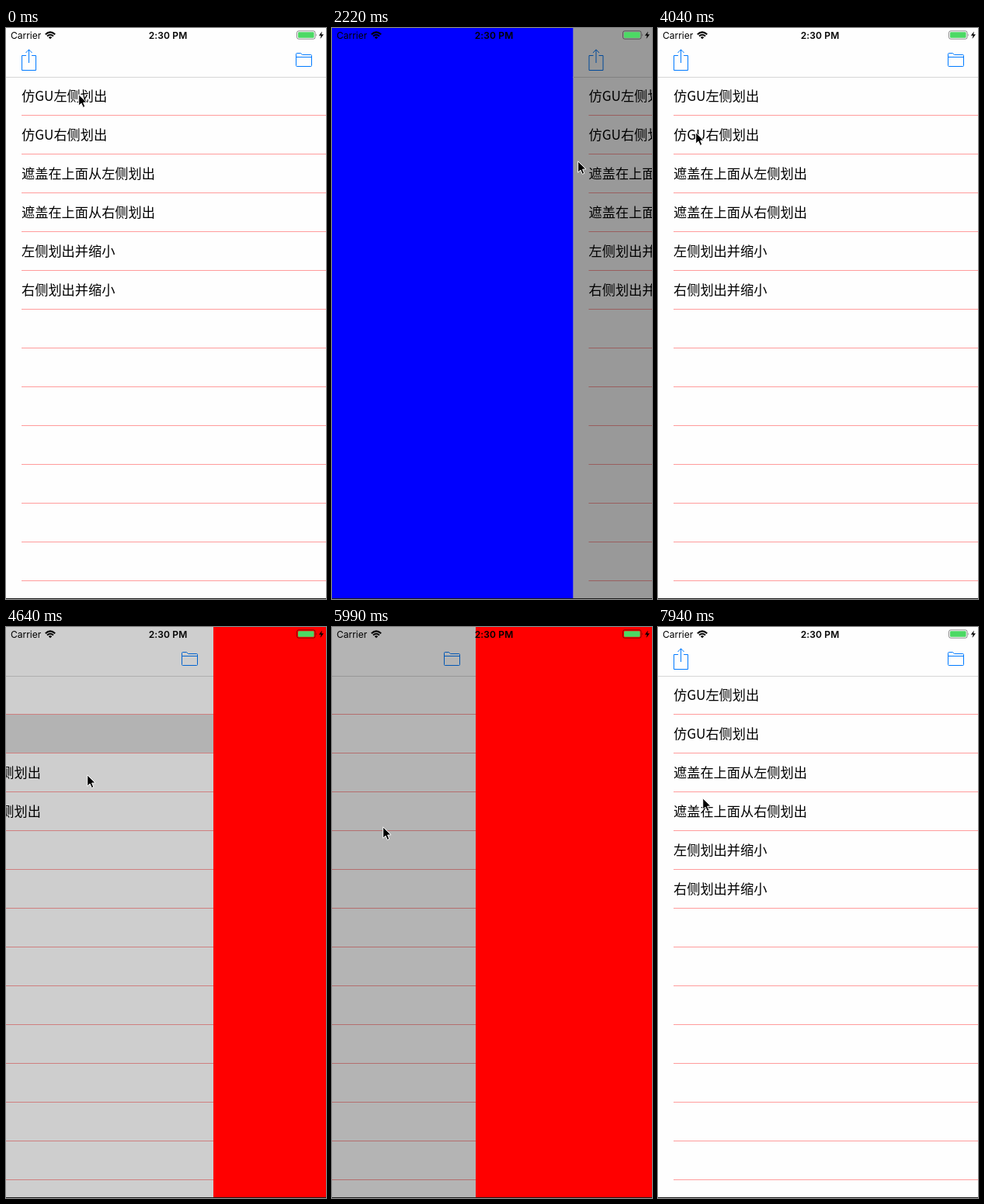
Write an HTML page that moves like this. It is 412x736 px and loops after 8 s.

```html
<!DOCTYPE html>
<html lang="zh-CN">
<head>
<meta charset="utf-8">
<title>Side drawers</title>
<style>
  html, body { margin: 0; width: 100%; height: 100%; overflow: hidden; }
  svg { display: block; width: 412px; height: 736px; }
  .row { font: 17.2px "Noto Sans CJK SC", "Noto Sans CJK", "Noto Sans SC", sans-serif; }
  .bar { font: 12px Inter, Roboto, sans-serif; }
  .clock { font-weight: 600; letter-spacing: .15px; text-anchor: middle; }
  .icon { fill: none; stroke: #007aff; stroke-width: 1; }
</style>
</head>
<body>
<svg viewBox="0 0 412 736" xmlns="http://www.w3.org/2000/svg">
  <rect id="drawer" width="412" height="736" fill="#00f"/>

  <g id="page">
    <rect width="414" height="736" fill="#fefefe"/>
    <rect id="pressed" y="113" width="414" height="49" fill="#dcdcdc"/>
    <rect y="63" width="414" height="1" fill="#d6d6d6"/>
    <g id="list"></g>
    <g class="icon">
      <path d="M26 35.5H20.5V54.5H38.5V35.5H33M29.5 28V45M25.5 32L29.5 27.8L33.5 32"/>
      <path d="M373.5 48.5V33.5Q373.5 32.5 374.5 32.5H379.5L381.5 34.5H392.5Q393.5 34.5 393.5 35.5V48.5Q393.5 49.5 392.5 49.5H374.5Q373.5 49.5 373.5 48.5ZM373.5 37.5H393.5"/>
    </g>
    <rect id="shade" width="414" height="736"/>
  </g>

  <g class="bar">
    <text x="6" y="14">Carrier</text>
    <text class="clock" x="208.5" y="14">2:30 PM</text>
    <g fill="none" stroke="#000" stroke-width="2">
      <path d="M50.8 8.2Q57 2.6 63.2 8.2"/>
      <path d="M53 10.6Q57 7 61 10.6"/>
    </g>
    <path d="M54.8 12Q57 10.2 59.2 12L57 14.3Z"/>
    <rect x="374.5" y="3.8" width="23.6" height="10.4" rx="2.4" fill="none" stroke="#000" stroke-opacity=".45"/>
    <rect x="376" y="5.3" width="20.6" height="7.4" rx="1.2" fill="#4cd964"/>
    <path d="M399.2 7.2Q400.8 9 399.2 10.8Z" fill-opacity=".45"/>
    <path d="M407 4.4L402.8 9.8H405.6L404.6 13.9L409 8.3H406.1Z"/>
  </g>

  <rect y="735" width="412" height="1" fill="#1c1c1c"/>
  <path id="cursor" d="M.7 .8V15.2L4 12.1L6.3 17.4L8.8 16.3L6.6 11.2L11 10.9Z" fill="#000" stroke="#fff" stroke-width="1" stroke-linejoin="round"/>
</svg>

<script>
const LOOP = 8000, REFRESH = 150, LEAD = 30;
const DRAWER = 414 * 0.75;
const $ = id => document.getElementById(id);

const labels = ["仿GU左侧划出", "仿GU右侧划出", "遮盖在上面从左侧划出",
                "遮盖在上面从右侧划出", "左侧划出并缩小", "右侧划出并缩小"];
let rows = "";
for (let y = 112, i = 0; y < 736; y += 50, i++) {
  rows += `<rect x="20" y="${y}" width="394" height="1" fill="#ff9c9c"/>`;
  if (labels[i]) rows += `<text class="row" x="20" y="${y - 17.6}">${labels[i]}</text>`;
}
$("list").innerHTML = rows;

const ramp = (t, from, to) => Math.min(1, Math.max(0, (t - from) / (to - from)));
const smooth = p => p * p * (3 - 2 * p);
const ease = (t, from, to) => smooth(ramp(t, from, to));

// Dragged open to the right, closed, opened to the left, closed.
const shift = t => DRAWER * (ramp(t, 920, 2220) ** 1.3 - ease(t, 3100, 3460)
                             - ease(t, 4480, 4770) + ease(t, 5850, 6208));

// Where the pointer rests or turns: time, x, y
const stops = [
  [0, 93, 85], [870, 6, 133], [1120, 6, 133], [1320, 227, 143],
  [2220, 316, 171], [2820, 345, 178], [4020, 48, 134], [4470, 48, 134],
  [4620, 104, 190], [4770, 187, 344], [5220, 187, 344], [5520, 36, 313],
  [5820, 36, 313], [5970, 65, 257], [6420, 90, 236], [7170, 6, 228],
  [7770, 48, 222], [7920, 57, 220]
];

function pointer(t) {
  let [, x, y] = stops[0];
  for (let i = 1; i < stops.length; i++) {
    const [t0, x0, y0] = stops[i - 1], [t1, x1, y1] = stops[i];
    const p = ease(t, t0, t1);
    x += (x1 - x0) * p;
    y += (y1 - y0) * p;
  }
  return `translate(${Math.round(x)} ${Math.round(y)})`;
}

function draw(now) {
  // The picture is held between refreshes.
  const tick = Math.floor((now % LOOP + LEAD) / REFRESH) * REFRESH - LEAD;
  const t = Math.max(0, tick);
  const x = Math.round(shift(t) * 2) / 2;
  $("drawer").setAttribute("fill", x < 0 ? "#f00" : "#00f");
  $("page").setAttribute("transform", `translate(${x} 0)`);
  $("shade").setAttribute("opacity", 0.4 * Math.abs(x) / DRAWER);
  $("pressed").setAttribute("visibility", t >= 4470 && t < 4770 ? "visible" : "hidden");
  $("cursor").setAttribute("transform", pointer(t));
}

const start = performance.now();
function loop() {
  draw(performance.now() - start);
  requestAnimationFrame(loop);
}
loop();
</script>
</body>
</html>
```
